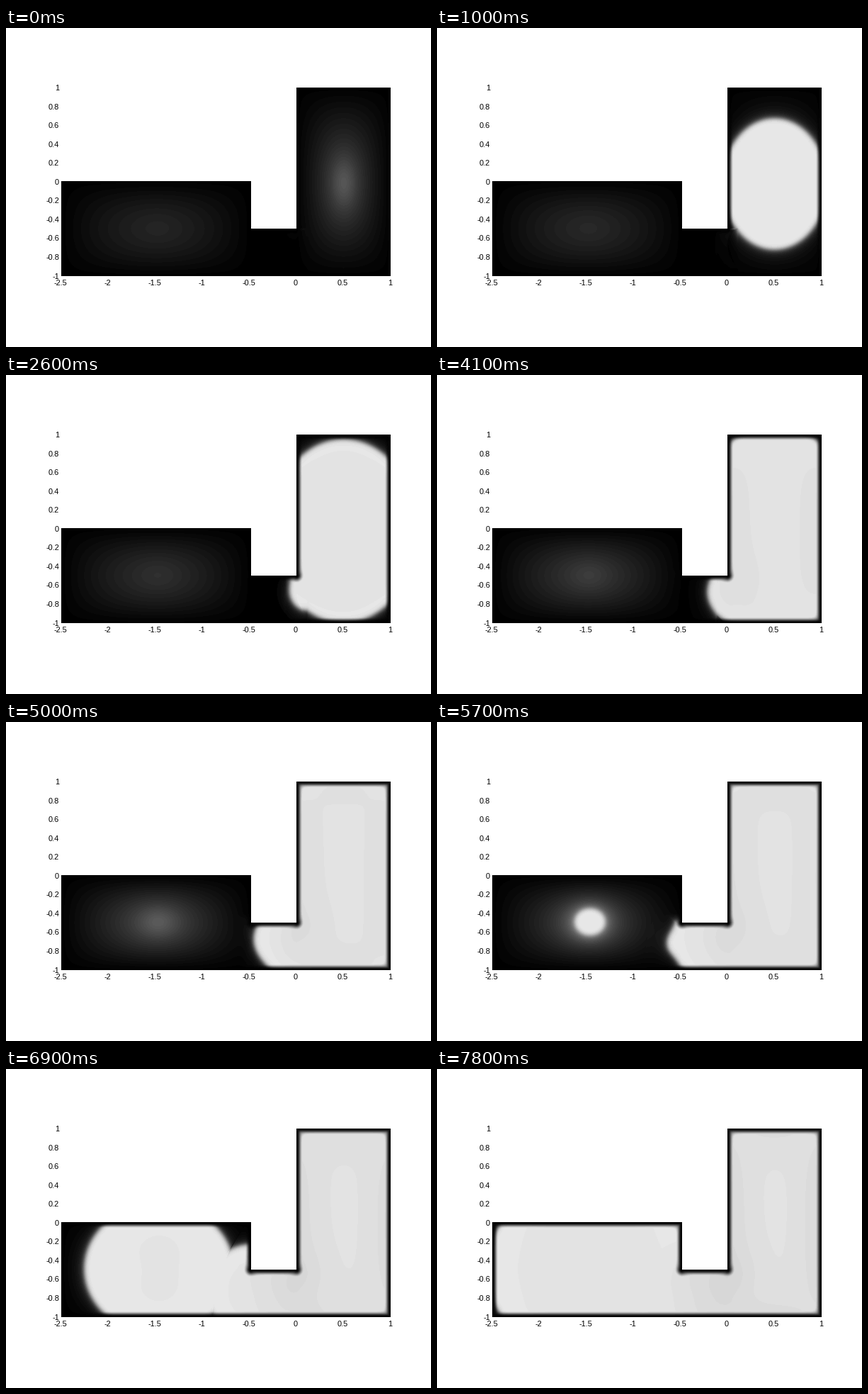
Recreate the animation shown at these times as a matplotlib script. Size 600 by 450 pixels, loop 7900 ms.

```python
import numpy as np
import matplotlib.pyplot as plt
from matplotlib.animation import FuncAnimation

W, H, DPI = 600, 450, 100
FRAMES, STEP = 79, 100
IGNITE_R, IGNITE_L = .35, 5.6

Y, X = np.mgrid[0:H, 0:W] + 0.5

# Outline: left chamber, corridor, right chamber
L, R, TOP, BOTTOM = 78, 543, 84, 350
STEP_X, STEP_Y, NECK_X, NECK_Y = 346, 216, 410, 283
OUTLINE = [(L, STEP_Y), (STEP_X, STEP_Y), (STEP_X, NECK_Y), (NECK_X, NECK_Y),
           (NECK_X, TOP), (R, TOP), (R, BOTTOM), (L, BOTTOM)]


def box(x0, y0, x1, y1):
    return (X > x0) & (X < x1) & (Y > y0) & (Y < y1)


def wall_dist(a, b):
    (x0, x1), (y0, y1) = sorted((a[0], b[0])), sorted((a[1], b[1]))
    return np.hypot(X - np.clip(X, x0, x1), Y - np.clip(Y, y0, y1))


def smooth(d, lo, hi):
    u = np.clip((d - lo) / (hi - lo), 0, 1)
    return u * u * (3 - 2 * u)


def dome(x0, y0, x1, y1):
    u = np.clip((X - x0) / (x1 - x0), 0, 1)
    v = np.clip((Y - y0) / (y1 - y0), 0, 1)
    return np.sin(np.pi * u) * np.sin(np.pi * v)


def peak(cx, cy, a, b):
    return 1 / (1 + ((X - cx) / a) ** 2 + ((Y - cy) / b) ** 2)


inside = (box(L, STEP_Y, STEP_X, BOTTOM) | box(L, NECK_Y, R, BOTTOM)
          | box(NECK_X, TOP, R, BOTTOM))

# Soft minimum of the wall distances rounds the corners
walls = zip(OUTLINE, OUTLINE[1:] + OUTLINE[:1])
depth = sum((wall_dist(a, b) + .01) ** -3 for a, b in walls) ** (-1 / 3)
rim = smooth(depth, 1, 8.5)

dome_l = dome(L, STEP_Y, STEP_X, BOTTOM)
dome_r = dome(NECK_X, TOP, R, BOTTOM)
peak_l = dome_l * peak(215, 282, 34, 28)
peak_r = dome_r * peak(477, 219, 22, 44)


def arrival():
    """Time in seconds at which the bright front reaches each pixel."""
    right = IGNITE_R + (np.hypot(1.25 * (X - 476.5), Y - 220) / 104) ** 3.7
    left = IGNITE_L + (np.hypot((X - 216) / 1.14, Y - 282) / 78.5) ** 1.6

    # Corridor front: a shallow curve that opens into a circle past the exit
    dx = STEP_X - X
    span = NECK_X - STEP_X
    curve = dx + .013 * (Y - 306) ** 2
    ring = np.hypot(dx, Y - 312)
    mix = smooth(np.maximum(dx / 25, (290 - Y) / 20), 0, 1) * (dx > 0)
    path = span + curve + (ring - curve) * mix
    neck = np.interp(path, [-60, 0, 28, 103, 900], [1, 1.8, 4.1, 6.2, 28])

    upper = (X > NECK_X) * (291 - Y) / 8
    k = np.clip(np.maximum((X - 395) / 30, upper), 0, 1)
    return np.minimum(left, neck + (right - neck) * k)


T = arrival()
gy, gx = np.gradient(T)
slope = np.maximum(np.hypot(gx, gy), .003)
cool = 1.5 * (1 - np.clip(depth / 55, 0, 1))
cool += 1.8 * np.exp(-((X - 385) / 45) ** 2 - ((Y - 312) / 50) ** 2)


def warm(t, t0, base, gain, dome, peak):
    """Glow that runs away towards ignition at t0 and then fades."""
    hot = gain / max(t0 - t, gain / 110)
    fade = np.exp(-max(t - t0, 0) / .2)
    return base * (.5 + .5 * fade) * dome + hot * fade * peak


def field(t):
    cold = warm(t, IGNITE_L, 31 + 2.5 * t, 28, dome_l, peak_l)
    cold += warm(t, IGNITE_R, 35, 17.5, dome_r, peak_r)

    phi = np.clip((t - T) / slope, -80, 80)
    burnt = 1 / (1 + np.exp(-phi / 2))
    halo = 40 * np.exp(np.minimum(phi, 0) / 9) * (1 - burnt)
    age = np.maximum(t - T, 0)
    hot = 233 - 6 * (1 - np.exp(-age)) - cool * age

    v = cold * (1 - burnt) + rim * (hot * burnt + halo)
    v = np.round(np.clip(v, 0, 255) / 255 * 63) / 63 * 255
    return np.where(inside, v, 255)


fig = plt.figure(figsize=(W / DPI, H / DPI), dpi=DPI, facecolor="white")
ax = fig.add_axes([0, 0, 1, 1])
img = ax.imshow(field(0), cmap="gray", vmin=0, vmax=255, extent=(0, W, H, 0),
                interpolation="nearest", aspect="auto")
ax.set_xlim(0, W)
ax.set_ylim(H, 0)
ax.axis("off")


def label(x, y, value, ha):
    ax.text(x, y, f"{value:g}", ha=ha, va="baseline", color="black",
            family="Liberation Sans", fontsize=11 * 72 / DPI)


for i in range(11):
    label(75, 88 + 26.55 * i, round(1 - .2 * i, 1), "right")
for i in range(8):
    label(76.5 + 66.5 * i, 363, -2.5 + .5 * i, "center")


def update(i):
    img.set_data(field(i * STEP / 1000))
    return (img,)


anim = FuncAnimation(fig, update, frames=FRAMES, interval=STEP,
                     repeat=True, repeat_delay=0, blit=False)
plt.show()
```
